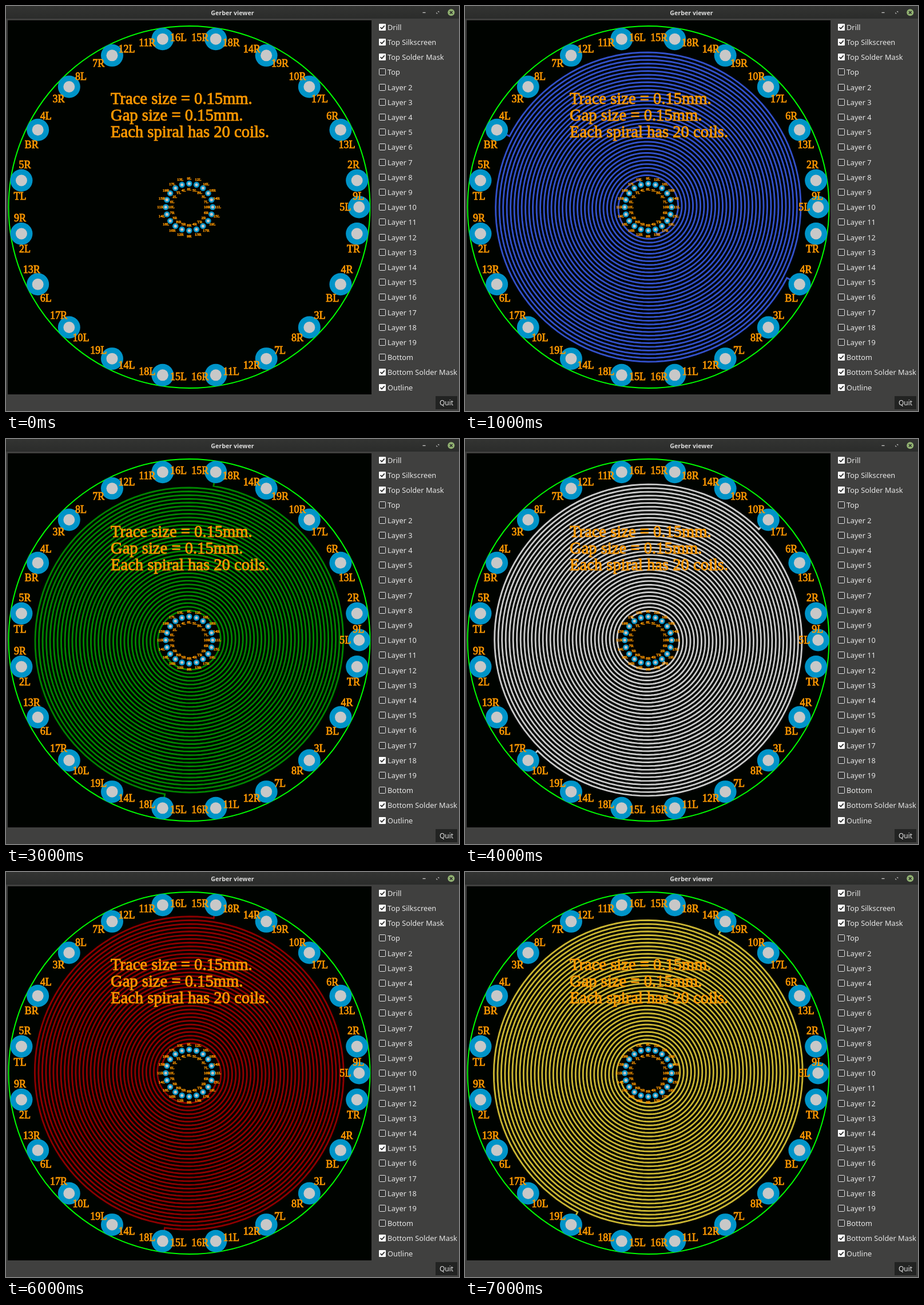
Animation, 792 px wide and 707 px high, one loop 8000 ms. Source, as an HTML page:

```html
<!DOCTYPE html>
<html lang="en">
<head>
<meta charset="utf-8">
<title>Gerber viewer</title>
<style>
  html, body { margin: 0; width: 100%; height: 100%; overflow: hidden; background: #40403f; }
  svg { display: block; width: 792px; height: 707px; }
  .ui { font: 12px "Noto Sans", "Open Sans", sans-serif; fill: #e6e6e6; }
  .row { font-size: 12.8px; font-weight: 300; }
  .title { font: bold 10.7px "Noto Sans", "Open Sans", sans-serif; fill: #dadada; text-anchor: middle; }
  .silk { font-family: "Liberation Serif", "Times New Roman", serif; fill: #ff9900; stroke: #ff9900; }
  .mid { text-anchor: middle; }
  .step { visibility: hidden; animation: show 8s step-end infinite; }
  @keyframes show {
    0% { visibility: visible; }
    12.5%, 100% { visibility: hidden; }
  }
</style>
</head>
<body>
<svg id="stage" viewBox="0 0 792 707" xmlns="http://www.w3.org/2000/svg">
  <defs>
    <linearGradient id="bar" x2="0" y2="1">
      <stop offset="0" stop-color="#333432"/>
      <stop offset="1" stop-color="#2b2c2b"/>
    </linearGradient>
  </defs>
  <rect width="792" height="707" fill="#40403f"/>
  <rect width="792" height="22" fill="url(#bar)"/>
  <text class="title" x="396" y="15.5">Gerber viewer</text>
  <path d="M728.5 11.5h5" stroke="#c8c8c8" stroke-width="1.3"/>
  <path d="M754.5 9h2.7v2.7zM752.3 10.8v2.7h2.7z" fill="#b4b4b4"/>
  <circle cx="778.3" cy="11.2" r="6" fill="#92b372"/>
  <path d="M776 9l4.6 4.6m0-4.6l-4.6 4.6" stroke="#2b2c2b" stroke-width="1.5"/>
  <rect x="3" y="25" width="636" height="653" fill="#000300"/>
  <g id="board"></g>
  <g id="list"></g>
  <rect x="751" y="681" width="38" height="23" fill="#222322"/>
  <text class="ui mid" x="770" y="696.5">Quit</text>
</svg>
<script>
const CX = 320.3, CY = 351, PAD_R = 297, VIA_R = 41;
const MM = 19.49; // pixels per millimetre
const R_START = 2.55 * MM, PITCH = 2 / 3 * MM, TRACE = 0.15 * MM, TURNS = 17;
const MASK = '#0094c8', HOLE = '#c8c8c8';
const board = document.getElementById('board');
const list = document.getElementById('list');

function add(parent, tag, attrs, text) {
  const el = document.createElementNS('http://www.w3.org/2000/svg', tag);
  for (const key in attrs) el.setAttribute(key, attrs[key]);
  if (text) el.textContent = text;
  parent.appendChild(el);
  return el;
}

// Polar position around the board centre, counter-clockwise degrees.
function polar(r, deg) {
  const a = deg * Math.PI / 180;
  return [CX + r * Math.cos(a), CY - r * Math.sin(a)];
}

function stepped(el, second) {
  el.setAttribute('class', 'step');
  el.style.animationDelay = (second - 8) + 's';
  return el;
}

// One arm from its via to its pad; dir is 1 when it grows counter-clockwise.
function arm(end, dir) {
  const sweep = TURNS * 360 + (dir > 0 ? 45 : 81);
  const start = end - dir * sweep;
  const points = [polar(VIA_R, start)];
  for (let t = 0; t <= sweep; t += 3) {
    points.push(polar(R_START + PITCH * t / 360, start + dir * t));
  }
  points.push(polar(PAD_R, end));
  return points.map(p => p[0].toFixed(2) + ',' + p[1].toFixed(2)).join(' ');
}

function pad(r, deg, size, hole) {
  const [cx, cy] = polar(r, deg);
  add(board, 'circle', { cx, cy, r: size, fill: MASK });
  add(board, 'circle', { cx, cy, r: hole, fill: HOLE });
}

function label(text, r, deg, size, weight) {
  const [x, y] = polar(r, deg);
  add(board, 'text', {
    class: 'silk mid', x, y: y + size * 0.33, 'font-size': size, 'stroke-width': weight
  }, text);
}

add(board, 'circle', { cx: 320.5, cy: CY, r: 316, fill: 'none', stroke: '#00ff00', 'stroke-width': 2 });

// Colour, pad angle and winding direction, from the bottom layer upwards.
const layers = [
  ['#3250c8', 153, 1],
  ['#8c008c', 63, -1],
  ['#008400', 81, 1],
  ['#c8c8c8', 45, -1],
  ['#8c008c', 99, 1],
  ['#8c0000', 81, -1],
  ['#c8b432', 63, 1]
];
layers.forEach(([stroke, end, dir], i) => {
  const g = stepped(add(board, 'g', { fill: 'none', stroke, 'stroke-width': TRACE }), i + 1);
  for (const turn of [0, 180]) add(g, 'polyline', { points: arm(end + turn, dir) });
});

for (let k = 0; k < 20; k++) {
  pad(PAD_R, 9 + 18 * k, 19.5, 10);
  pad(VIA_R, 18 * k, 5.2, 2.6);
}
pad(PAD_R, 0, 19.5, 10);

const outer = ('9L 2R 13L 6R 17L 10R 19R 14R 18R 15R 16L 11R 12L 7R 8L 3R 4L BR 5R TL ' +
  '9R 2L 13R 6L 17R 10L 19L 14L 18L 15L 16R 11L 12R 7L 8R 3L BL 4R TR').split(' ');
outer.forEach((name, i) => {
  label(name, 296.5, 9 + 18 * (i >> 1) + (i % 2 ? 5.35 : -5.35), 18, 0.8);
});
label('5L', 273, 0, 18, 0.8);

const viaOut = '11L 14R 18R 16L 12L 9L 13L 17L 19R 15R 11R 14L 18L 16R 12R 9R 13R 17R 19L 15L'.split(' ');
const viaIn = '10R 7L 3L BL 5L 8L 4L TL 2L 6L 10L 7R 3R BR 5R 8R 4R TR 2R 6R'.split(' ');
viaOut.forEach((name, i) => label(name, 50.3, 18 * i, 7, 0.5));
viaIn.forEach((name, i) => label(name, 31.2, 18 * i, 7, 0.5));

['Trace size = 0.15mm.', 'Gap size = 0.15mm.', 'Each spiral has 20 coils.'].forEach((line, i) => {
  add(board, 'text', {
    class: 'silk', x: 183, y: 171 + 29 * i, 'font-size': 28.6, 'stroke-width': 0.9
  }, line);
});

function tick(parent, y) {
  add(parent, 'rect', { x: 652, y: y - 6, width: 12, height: 12, rx: 1, fill: '#fff' });
  add(parent, 'path', {
    d: `M654.5 ${y}l2.5 2.7 4.8-5.4`, fill: 'none', stroke: '#303030', 'stroke-width': 1.8
  });
}

const rows = ['Drill', 'Top Silkscreen', 'Top Solder Mask', 'Top'];
for (let n = 2; n < 20; n++) rows.push('Layer ' + n);
rows.push('Bottom', 'Bottom Solder Mask', 'Outline');
rows.forEach((name, i) => {
  const y = Math.round(36.7 + 26.2 * i);
  const second = 23 - i;
  add(list, 'text', { class: 'ui row', x: 667, y: y + 4.5 }, name);
  if (i < 3 || i > 22) {
    tick(list, y);
    return;
  }
  add(list, 'rect', {
    x: 652.5, y: y - 5.5, width: 11, height: 11, rx: 1, fill: '#383838', stroke: '#e6e6e6'
  });
  if (second <= layers.length) tick(stepped(add(list, 'g', {}), second), y);
});
</script>
</body>
</html>
```
